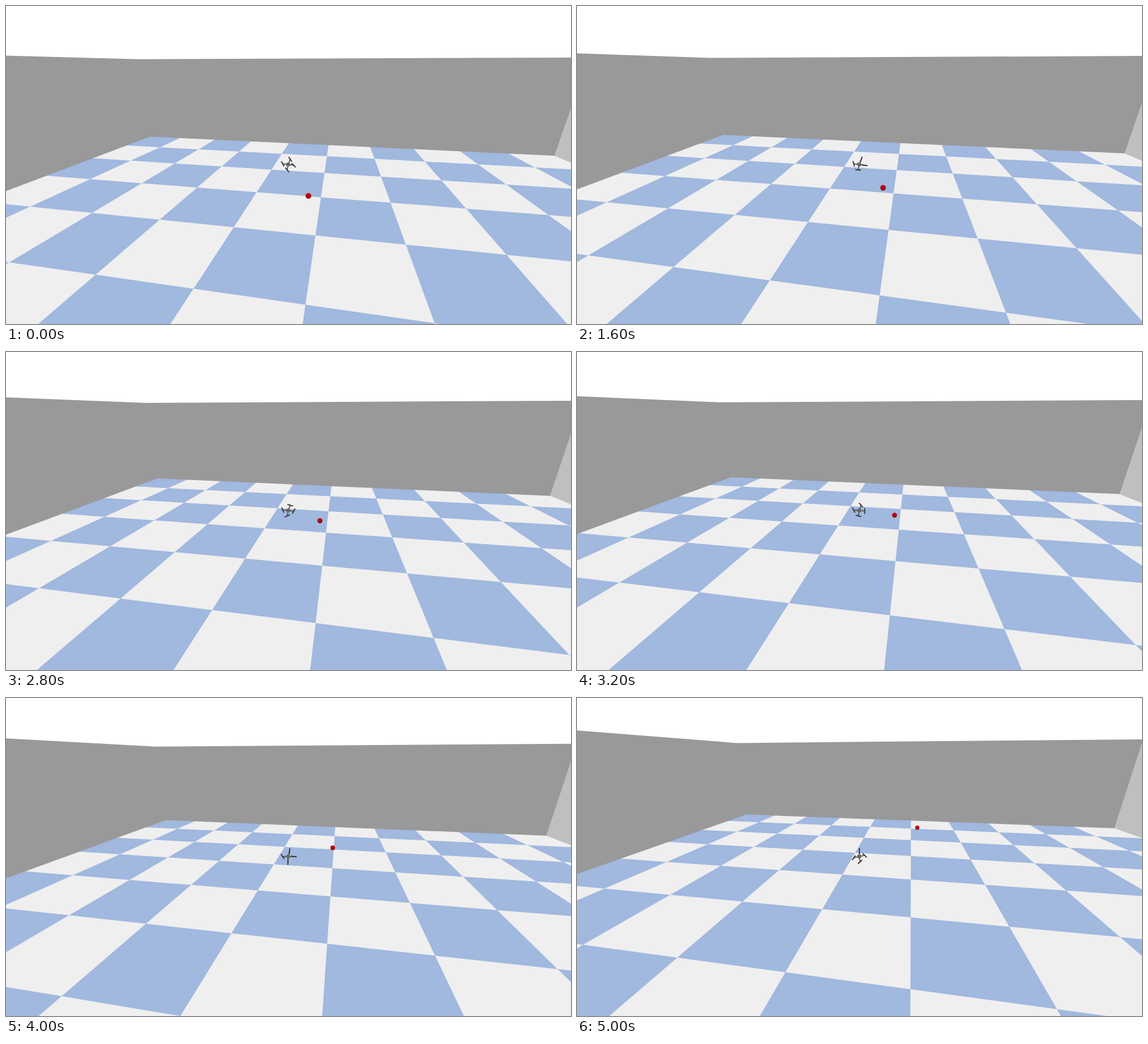
These frames come from a looping animation (998x561 px, 5100 ms). An HTML page:

```html
<!DOCTYPE html>
<html lang="en">
<head>
<meta charset="utf-8">
<title>Drone flight</title>
<style>
html, body { margin: 0; width: 100%; height: 100%; overflow: hidden; background: #fff; }
svg { display: block; width: 998px; height: 561px; }
</style>
</head>
<body>
<svg viewBox="0 0 998 561">
  <defs>
    <radialGradient id="red" cx="0.42" cy="0.3" r="0.75">
      <stop offset="0" stop-color="#cc0606"/>
      <stop offset="0.55" stop-color="#b00404"/>
      <stop offset="1" stop-color="#650000"/>
    </radialGradient>
  </defs>
  <path id="floor" fill="#efefef"/>
  <path id="tiles" fill="#a1b8df"/>
  <path id="walls" fill="#999"/>
  <path id="side" fill="#bfbfbf"/>
  <circle id="ball" fill="url(#red)"/>
  <g fill="none" stroke-linecap="round">
    <path id="arms" stroke="#555" stroke-width="1.8"/>
    <path id="props" stroke="#333" stroke-width="1.9"/>
  </g>
  <ellipse cx="498.5" cy="279.5" rx="3.8" ry="3.5" fill="#686868"/>
</svg>
<script>
const LOOP = 5100, STEP = 100;
const CX = 499, CY = 280.5, FOCAL = CY / Math.tan(Math.PI / 6);
const rad = d => d * Math.PI / 180;
const sy = Math.sin(rad(10)), cy = Math.cos(rad(10));
const sp = Math.sin(rad(20)), cp = Math.cos(rad(20));
const ROOM = 4.9, TOP = 2, NEAR = 0.1;

// Camera path and drone pose at a few times (seconds)
const times = [0, 0.8, 1.6, 2.4, 3.2, 4, 5];
const camera = [
  [0.165, 0.1588, 0.147, 0.122, 0.0822, 0.0165, -0.099],
  [-1.746, -1.754, -1.817, -1.933, -2.099, -2.3055, -2.646],
  [1.868, 1.8505, 1.836, 1.819, 1.793, 1.743, 1.641]
];
const heading = [0, 0, 0, 0, -3, -8, -20];
const rotors = [
  { at: 186, spin: [60, 63, 74, 72, 63, 55, 127] },
  { at: -68, spin: [55, 63, 110, 165, 229, 275, 270] },
  { at: 9, spin: [45, 63, 7, -36, -90, -175, -135] },
  { at: 101, spin: [50, 36, 5, -45, 14, 90, 138] }
];

const el = id => document.getElementById(id);

// Smooth cubic through the key values
function curve(v, t) {
  const last = times.length - 1;
  let i = 0;
  while (i < last - 1 && t >= times[i + 1]) i++;
  const slope = k => {
    const a = Math.max(k - 1, 0), b = Math.min(k + 1, last);
    return (v[b] - v[a]) / (times[b] - times[a]);
  };
  const w = times[i + 1] - times[i], s = (t - times[i]) / w;
  const s2 = s * s, s3 = s2 * s;
  return v[i] * (2 * s3 - 3 * s2 + 1) + v[i + 1] * (3 * s2 - 2 * s3)
    + w * (slope(i) * (s3 - 2 * s2 + s) + slope(i + 1) * (s3 - s2));
}

function toView(p, cam) {
  const [x, y, z] = p.map((c, i) => c - cam[i]);
  const ahead = y * cy - x * sy;
  return [x * cy + y * sy, -ahead * sp - z * cp, ahead * cp - z * sp];
}

const toScreen = ([x, y, z]) => [CX + FOCAL * x / z, CY + FOCAL * y / z];

// Projects a polygon, cut at the near plane
function face(points, cam) {
  const view = points.map(p => toView(p, cam)), out = [];
  view.forEach((a, i) => {
    const b = view[(i + 1) % view.length];
    if (a[2] >= NEAR) out.push(a);
    if ((a[2] >= NEAR) !== (b[2] >= NEAR)) {
      const k = (NEAR - a[2]) / (b[2] - a[2]);
      out.push(a.map((c, j) => c + (b[j] - c) * k));
    }
  });
  if (out.length < 3) return "";
  return "M" + out.map(p => toScreen(p).map(n => n.toFixed(2)).join(" ")).join("L") + "Z";
}

const rect = (x0, y0, x1, y1) => [[x0, y0, 0], [x1, y0, 0], [x1, y1, 0], [x0, y1, 0]];
const wall = (x0, y0, x1, y1) => [[x0, y0, 0], [x1, y1, 0], [x1, y1, TOP], [x0, y0, TOP]];

const tiles = [];
for (let x = -5; x < 5; x++)
  for (let y = -5; y < 5; y++)
    if ((x + y) & 1) tiles.push(rect(x, y, x + 1, y + 1));

function drawDrone(t) {
  let arms = "", props = "";
  const ox = 498.5, oy = 279.5, turn = curve(heading, t);
  for (const r of rotors) {
    const a = rad(r.at + turn), b = rad(curve(r.spin, t));
    const x = ox + 9.8 * Math.cos(a), y = oy + 9.8 * Math.sin(a);
    const dx = 4.3 * Math.cos(b), dy = 4.3 * Math.sin(b);
    arms += `M${ox} ${oy}L${x} ${y}`;
    props += `M${x - dx} ${y - dy}L${x + dx} ${y + dy}`;
  }
  el("arms").setAttribute("d", arms);
  el("props").setAttribute("d", props);
}

function draw(ms) {
  const t = Math.floor(ms % LOOP / STEP) * STEP / 1000;
  const cam = camera.map(v => curve(v, t));
  const set = (id, faces) =>
    el(id).setAttribute("d", faces.map(f => face(f, cam)).join(""));

  set("floor", [rect(-5, -5, 5, 5)]);
  set("tiles", tiles);
  set("walls", [wall(-ROOM, -ROOM, -ROOM, ROOM), wall(-ROOM, ROOM, 5.2, ROOM)]);
  set("side", [wall(ROOM, ROOM, ROOM, -ROOM)]);

  const view = toView([0, 0, 1], cam), [x, y] = toScreen(view);
  const ball = el("ball");
  ball.setAttribute("cx", x);
  ball.setAttribute("cy", y);
  ball.setAttribute("r", FOCAL * 0.02 / view[2]);

  drawDrone(t);
}

const start = performance.now();
function tick() {
  draw(performance.now() - start);
  requestAnimationFrame(tick);
}
tick();
</script>
</body>
</html>
```
